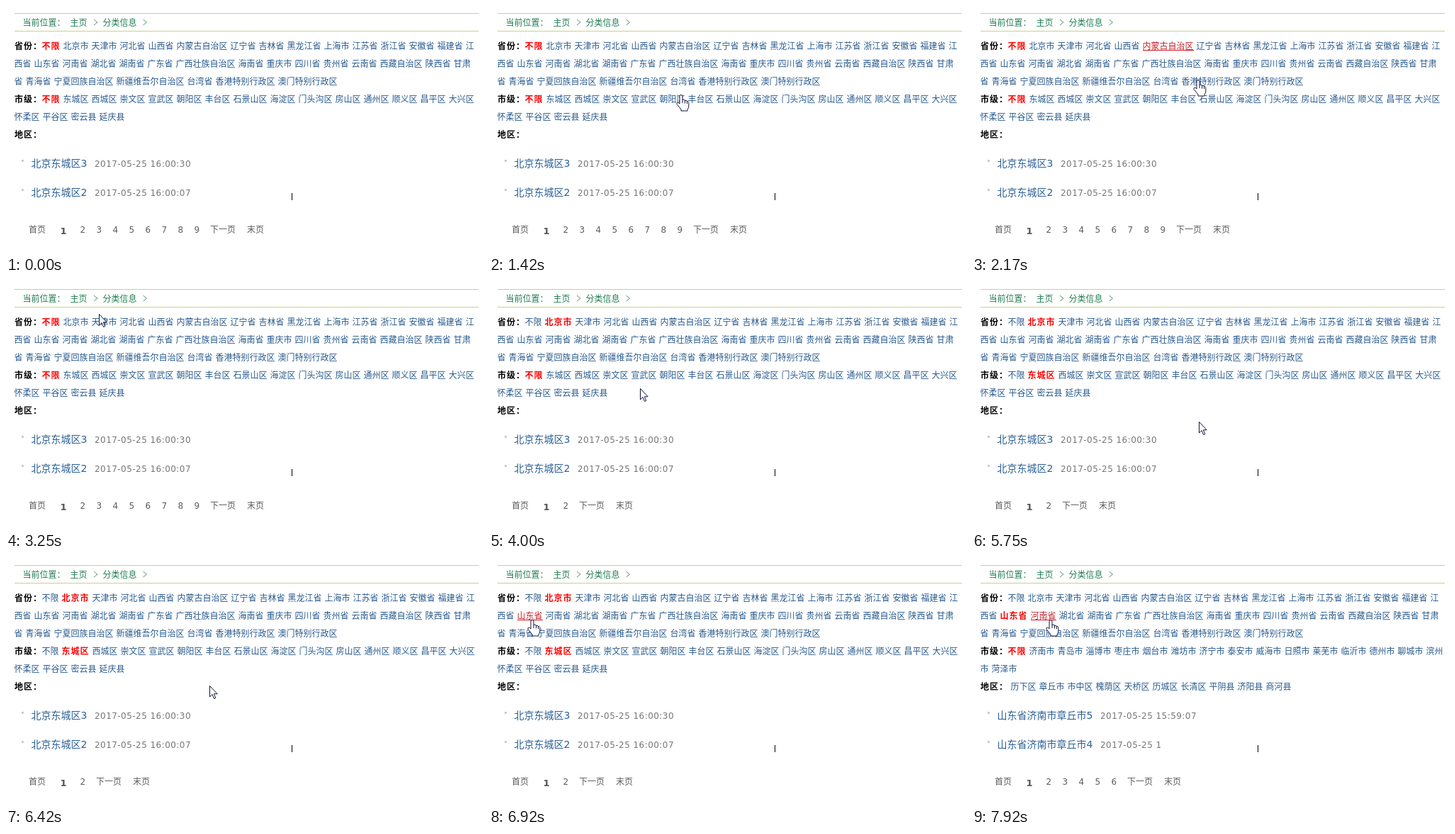
Animation of 673 by 350 pixels, one loop 8000 ms. Source, as an HTML page:

```html
<!DOCTYPE html>
<html lang="zh-CN">
<head>
<meta charset="utf-8">
<title>分类信息</title>
<style>
html, body { margin: 0; width: 100%; height: 100%; overflow: hidden; background: #fff; }
svg { display: block; width: 673px; height: 350px; }
text { font: 12px "DejaVu Sans", "Noto Sans CJK SC", "Noto Sans CJK", sans-serif; fill: #285a8e; }
.label { font-weight: bold; letter-spacing: 1px; fill: #000; }
.on { font-weight: bold; letter-spacing: 1px; fill: #f00; }
.place { fill: #1f7d50; }
.title { font-size: 14px; fill: #2b6096; }
.date { fill: #777; letter-spacing: .45px; }
.pager { fill: #5c5c5c; }
.current { font-size: 13px; font-weight: bold; fill: #555; }
.hover { fill: #c8202a; }
</style>
</head>
<body>
<svg viewBox="0 0 673 350">
  <path d="M12 10.5H667M12 35.5H667" stroke="#cccc99"/>
  <path d="M124 19l5 4-5 4M193.500 19l5 4-5 4" fill="none" stroke="#5f8f74"/>
  <text class="place" x="23.500" y="27.500">当前位置：</text>
  <path d="M22 217h3v3h-3zM22 258h3v3h-3z" fill="#ccc"/>
  <g id="page"></g>
  <path d="M403.5 264V274" stroke="#000"/>
  <g id="pointer" fill="#fff" stroke="#10143a" stroke-linejoin="round">
    <path id="arrow" d="M.5 .5V16L4 12.6 6.6 18.5 8.8 17.5 6.3 11.8H11.2Z"/>
    <path id="hand" d="M-2 13V2Q-2 .5 0 .5T2 2V8Q2 7 3.7 7T5.5 9Q5.6 8 7 8.3T8.5 10Q9 9 10 9.6T10.8 11.5V17Q10 20 9 21V23H0V21Q-3 17-6 13.5-6.5 11-4.5 11-3 11.5-2 13ZM2 8v4M5.5 9v3.5M8.5 10v3"/>
  </g>
</svg>
<script>
const LOOP = 8000, STEPS_PER_MS = 12 / 1000, LEFT = 12, RIGHT = 667, LINE = 25;
const byId = id => document.getElementById(id);

const provinces = ('不限 北京市 天津市 河北省 山西省 内蒙古自治区 辽宁省 吉林省 黑龙江省 上海市 江苏省 浙江省 ' +
  '安徽省 福建省 江西省 山东省 河南省 湖北省 湖南省 广东省 广西壮族自治区 海南省 重庆市 四川省 贵州省 云南省 ' +
  '西藏自治区 陕西省 甘肃省 青海省 宁夏回族自治区 新疆维吾尔自治区 台湾省 香港特别行政区 澳门特别行政区').split(' ');
const beijing = ('不限 东城区 西城区 崇文区 宣武区 朝阳区 丰台区 石景山区 海淀区 门头沟区 房山区 通州区 ' +
  '顺义区 昌平区 大兴区 怀柔区 平谷区 密云县 延庆县').split(' ');
const shandong = ('不限 济南市 青岛市 淄博市 枣庄市 烟台市 潍坊市 济宁市 泰安市 威海市 日照市 莱芜市 ' +
  '临沂市 德州市 聊城市 滨州市 菏泽市').split(' ');
const jinan = '历下区 章丘市 市中区 槐荫区 天桥区 历城区 长清区 平阴县 济阳县 商河县'.split(' ');

const beijingPosts = [['北京东城区3', '2017-05-25 16:00:30'], ['北京东城区2', '2017-05-25 16:00:07']];
const shandongPosts = [['山东省济南市章丘市5', '2017-05-25 15:59:07'], ['山东省济南市章丘市4', '2017-05-25 1']];

// Each page shows from its step on.
const pages = [
  { from: 0, province: '不限', city: '不限', cities: beijing, areas: [], posts: beijingPosts, count: 9 },
  { from: 44, province: '北京市', city: '不限', cities: beijing, areas: [], posts: beijingPosts, count: 2 },
  { from: 63, province: '北京市', city: '东城区', cities: beijing, areas: [], posts: beijingPosts, count: 2 },
  { from: 90, province: '山东省', city: '不限', cities: shandong, areas: jinan, posts: shandongPosts, count: 6 }
];

// Pointer path: step, x, y.
const path = [
  [15, 313, 174], [18, 250, 100], [22, 165, 24], [23, 165, 24], [25, 270, 58], [26, 319, 104],
  [28, 357, 160], [30, 350, 185], [31, 350, 185], [34, 345, 198], [35, 345, 198], [36, 338, 150],
  [37, 300, 102], [38, 200, 67], [39, 131, 45], [42, 100, 56], [45, 100, 56], [49, 251, 181], [51, 251, 181],
  [59, 114, 137], [61, 100, 132], [64, 100, 132], [69, 320, 197], [72, 327, 198], [73, 330, 199],
  [74, 330, 199], [75, 332, 199], [76, 332, 199], [82, 61, 87], [93, 61, 87], [94, 90, 85], [95, 111, 87]
];

function pointerAt(step) {
  if (step < path[0][0]) return null;
  const next = path.findIndex(key => key[0] >= step);
  const [s1, x1, y1] = path[next];
  const [s0, x0, y0] = path[Math.max(0, next - 1)];
  const k = s1 > s0 ? (step - s0) / (s1 - s0) : 1;
  return { x: Math.round(x0 + (x1 - x0) * k), y: Math.round(y0 + (y1 - y0) * k) };
}

// Lays links out in lines that may break between any two characters.
function flow(names, selected, x, y) {
  const runs = [];
  for (const name of names) {
    const on = name === selected, charWidth = on ? 13 : 12;
    let run = null;
    for (const char of name) {
      if (x + charWidth > RIGHT) {
        x = LEFT;
        y += LINE;
        run = null;
      }
      if (!run) runs.push(run = { name, x, y, text: '', width: 0, style: on ? 'on' : '' });
      run.text += char;
      run.width += charWidth;
      x += charWidth;
    }
    x += 4;
  }
  return runs;
}

const label = (text, x, y, style) => `<text class="${style}" x="${x}" y="${y}">${text}</text>`;

function drawLink(run, hovered) {
  const hot = hovered && run.name === hovered.name && run.style === hovered.style;
  const style = run.style + (hot && run.style !== 'on' ? ' hover' : '');
  const line = hot
    ? `<path d="M${run.x} ${run.y + 6.5}h${run.width}" stroke="${run.style === 'on' ? '#f00' : '#c8202a'}"/>` : '';
  return label(run.text, run.x - 0.5, run.y + 4.5, style) + line;
}

function drawPosts(posts) {
  return posts.map(([title, date], i) => {
    const y = 227 + 41 * i;
    const end = 35.5 + 14 * (title.length - 1) + 9;
    return label(title, 35.5, y, 'title') + label(date, end + 10.5, y, 'date');
  }).join('');
}

function drawPager(count) {
  let out = label('首页', 32, 320, 'pager') + label('1', 76.5, 321.5, 'current');
  for (let n = 2; n <= count; n++) out += label(n, 104.5 + 23 * (n - 2), 320, 'pager');
  const next = 104 + 23 * (count - 1);
  return out + label('下一页', next, 320, 'pager') + label('末页', next + 52, 320, 'pager');
}

function linkUnder(point, links) {
  return point && links.find(run =>
    point.x >= run.x && point.x < run.x + run.width && Math.abs(point.y - run.y) <= 7);
}

function render(step) {
  const page = pages.filter(p => p.from <= step).pop();
  const links = [
    { name: '主页', text: '主页', x: 91, y: 23, width: 24, style: 'place' },
    { name: '分类信息', text: '分类信息', x: 137, y: 23, width: 48, style: 'place' },
    ...flow(provinces, page.province, 51, 56),
    ...flow(page.cities, page.city, 51, 131),
    ...flow(page.areas, '', 55, 181)
  ];
  const point = pointerAt(step);
  // The hover style trails the pointer by one step.
  const hovered = linkUnder(pointerAt(step - 1), links);

  byId('page').innerHTML =
    label('省份：', LEFT, 60.5, 'label') + label('市级：', LEFT, 135.5, 'label') + label('地区：', LEFT, 185.5, 'label') +
    links.map(run => drawLink(run, hovered)).join('') + drawPosts(page.posts) + drawPager(page.count);

  byId('pointer').style.display = point ? '' : 'none';
  if (!point) return;
  const hand = Boolean(linkUnder(point, links));
  byId('pointer').setAttribute('transform', `translate(${point.x} ${point.y})`);
  byId('hand').style.display = hand ? '' : 'none';
  byId('arrow').style.display = hand ? 'none' : '';
}

const start = performance.now();
let shown = -1;
function tick() {
  const time = (performance.now() - start) % LOOP;
  const step = Math.min(95, Math.floor(time * STEPS_PER_MS + 0.1));
  if (step !== shown) render(shown = step);
  requestAnimationFrame(tick);
}
tick();
</script>
</body>
</html>
```
